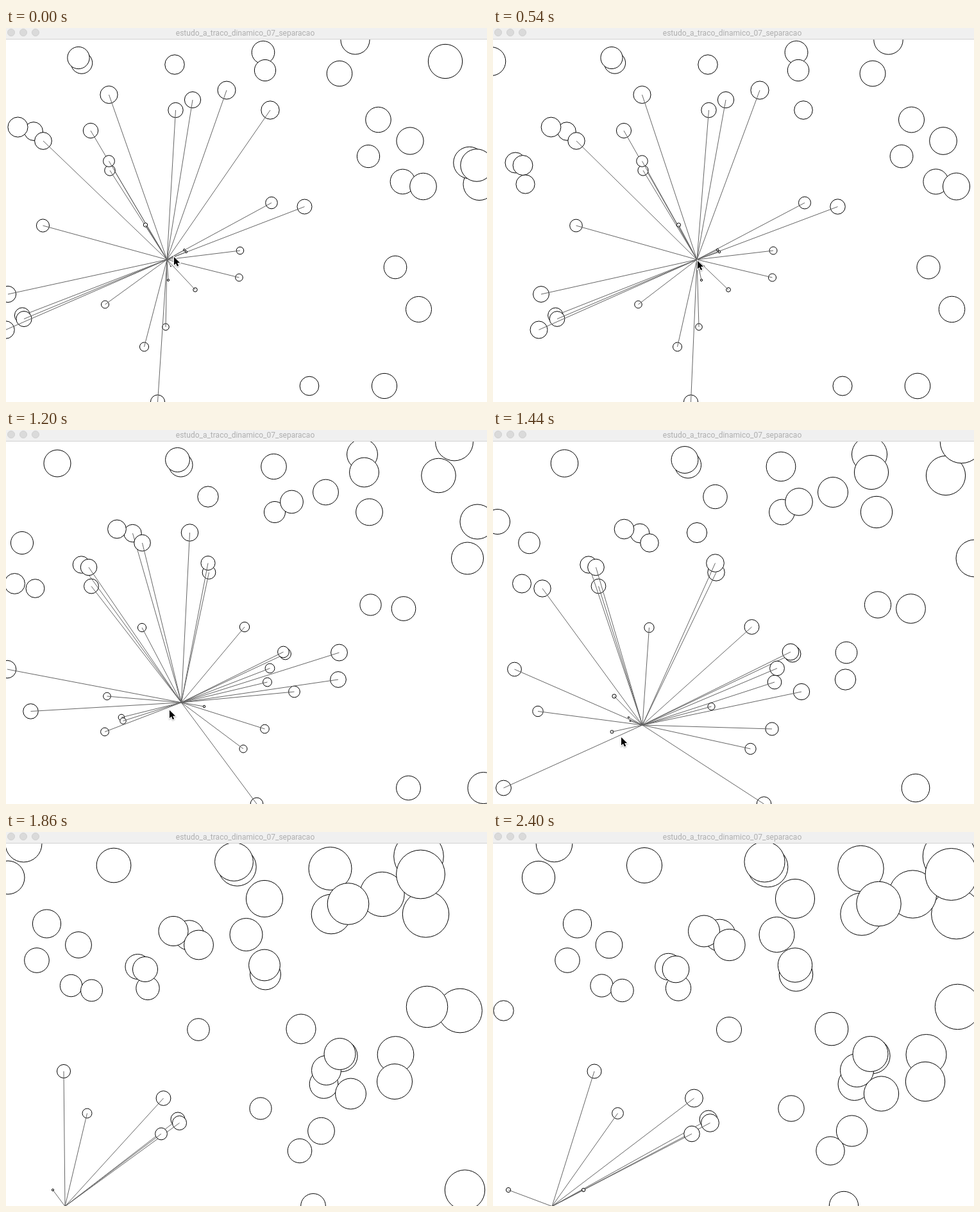
An HTML page with a canvas that plays this animation: 750x583 px, repeating every 2460 ms.

```html
<!DOCTYPE html>
<html lang="pt">
<head>
<meta charset="utf-8">
<title>Distância</title>
<style>
  html, body { margin: 0; overflow: hidden; background: #fff; }
  canvas { display: block; }
</style>
</head>
<body>
<canvas id="stage" width="750" height="583"></canvas>
<script>
const ctx = document.getElementById('stage').getContext('2d');
const LOOP = 2460, STEP = 60, WRAP = 759.5, MARGIN = 5, REACH = 284;

// Start positions, in drawing order
const points = [
  [118, 54.5], [113, 46.5], [263, 57], [401, 38], [412, 128],
  [344, 97], [264.5, 128], [291, 112], [404, 66], [520, 71],
  [544.5, 18.5], [685, 52], [160.5, 104], [132, 160], [43, 161],
  [18.5, 154.5], [58, 176], [162, 222], [160.5, 207.5], [57.5, 308],
  [465.5, 278.5], [414, 272.5], [580.5, 143], [630, 176], [565, 200],
  [618.5, 239.5], [650.5, 247], [738, 243.5], [722.5, 210], [734, 214],
  [217.5, 307], [281, 349], [253, 393], [257, 371.5], [278, 346],
  [295, 408], [365, 347], [363.5, 389], [154.5, 431], [249, 466],
  [215.5, 497], [236.5, 583], [3, 415], [25.5, 448], [28, 453.5],
  [-0.5, 470.5], [473, 558], [590, 558], [643.5, 438.5], [607, 373]
];

// time, horizontal drift
const drift = [[0, 0], [300, 41.5], [540, 72], [960, 123], [1440, 186], [1860, 242.5], [2400, 310.5]];

// time, line hub x/y, cursor x/y
const pointer = [
  [0, 251, 361, 262, 357],
  [300, 295, 347, 301, 347],
  [540, 318, 361, 319, 363],
  [960, 294, 404, 289, 409],
  [1440, 233, 460, 200, 479],
  [1740, 92, 583.5, 50, 605]
];

function segment(keys, t) {
  let i = 0;
  while (i < keys.length - 2 && t >= keys[i + 1][0]) i++;
  const span = keys[i + 1][0] - keys[i][0];
  return { i, span, u: Math.min(1, (t - keys[i][0]) / span) };
}

function linear(keys, t) {
  const { i, u } = segment(keys, t);
  return keys[i][1] + (keys[i + 1][1] - keys[i][1]) * u;
}

// Smooth curve through the keys, one value per column
function spline(keys, t, col) {
  const { i, span, u } = segment(keys, t);
  const slope = k => {
    const a = keys[Math.max(0, k - 1)], b = keys[Math.min(keys.length - 1, k + 1)];
    return (b[col] - a[col]) / (b[0] - a[0]) * span;
  };
  const p = keys[i][col], q = keys[i + 1][col], v = 1 - u;
  return p * v * v * (1 + 2 * u) + q * u * u * (3 - 2 * u)
    + slope(i) * u * v * v - slope(i + 1) * u * u * v;
}

function disc(x, y, r, fill, stroke) {
  ctx.beginPath();
  ctx.arc(x, y, r, 0, Math.PI * 2);
  ctx.fillStyle = fill;
  ctx.fill();
  ctx.strokeStyle = stroke;
  ctx.stroke();
}

function drawPoints(shift, hubX, hubY) {
  ctx.lineWidth = 1;
  for (const [startX, y] of points) {
    const x = (startX + shift + MARGIN) % WRAP - MARGIN;
    const distance = Math.hypot(x - hubX, y - hubY);
    disc(x, y, distance / 20, '#fff', '#000');
    if (distance < REACH) {
      ctx.beginPath();
      ctx.moveTo(hubX, hubY);
      ctx.lineTo(x, y);
      ctx.strokeStyle = '#646464';
      ctx.stroke();
    }
  }
}

const arrow = new Path2D('M0 0V12.6L2.9 9.9L5 14.6L7.2 13.6L5.1 9.1H9.1Z');

function drawCursor(x, y) {
  ctx.save();
  ctx.translate(x, y);
  ctx.shadowColor = 'rgba(0,0,0,.3)';
  ctx.shadowBlur = 2;
  ctx.shadowOffsetY = 1;
  ctx.lineWidth = 2;
  ctx.strokeStyle = '#fff';
  ctx.stroke(arrow);
  ctx.shadowColor = 'transparent';
  ctx.fillStyle = '#000';
  ctx.fill(arrow);
  ctx.restore();
}

function drawTitleBar() {
  ctx.fillStyle = '#f0f0f0';
  ctx.fillRect(0, 0, 750, 17);
  ctx.fillStyle = '#d2d2d2';
  ctx.fillRect(0, 17, 750, 1);
  for (const x of [8, 27, 46]) disc(x, 7, 5.5, '#dadada', '#d0d0d0');
  ctx.fillStyle = '#aeaeae';
  ctx.font = '12px Roboto, sans-serif';
  ctx.textAlign = 'center';
  ctx.fillText('estudo_a_traco_dinamico_07_separacao', 373, 12);
}

function frame() {
  const t = Math.floor(performance.now() % LOOP / STEP) * STEP;
  const [hubX, hubY, cursorX, cursorY] = [1, 2, 3, 4].map(col => spline(pointer, t, col));
  ctx.fillStyle = '#fff';
  ctx.fillRect(0, 0, 750, 583);
  drawPoints(linear(drift, t), hubX, hubY);
  drawCursor(cursorX, cursorY);
  drawTitleBar();
  requestAnimationFrame(frame);
}
frame();
</script>
</body>
</html>
```
